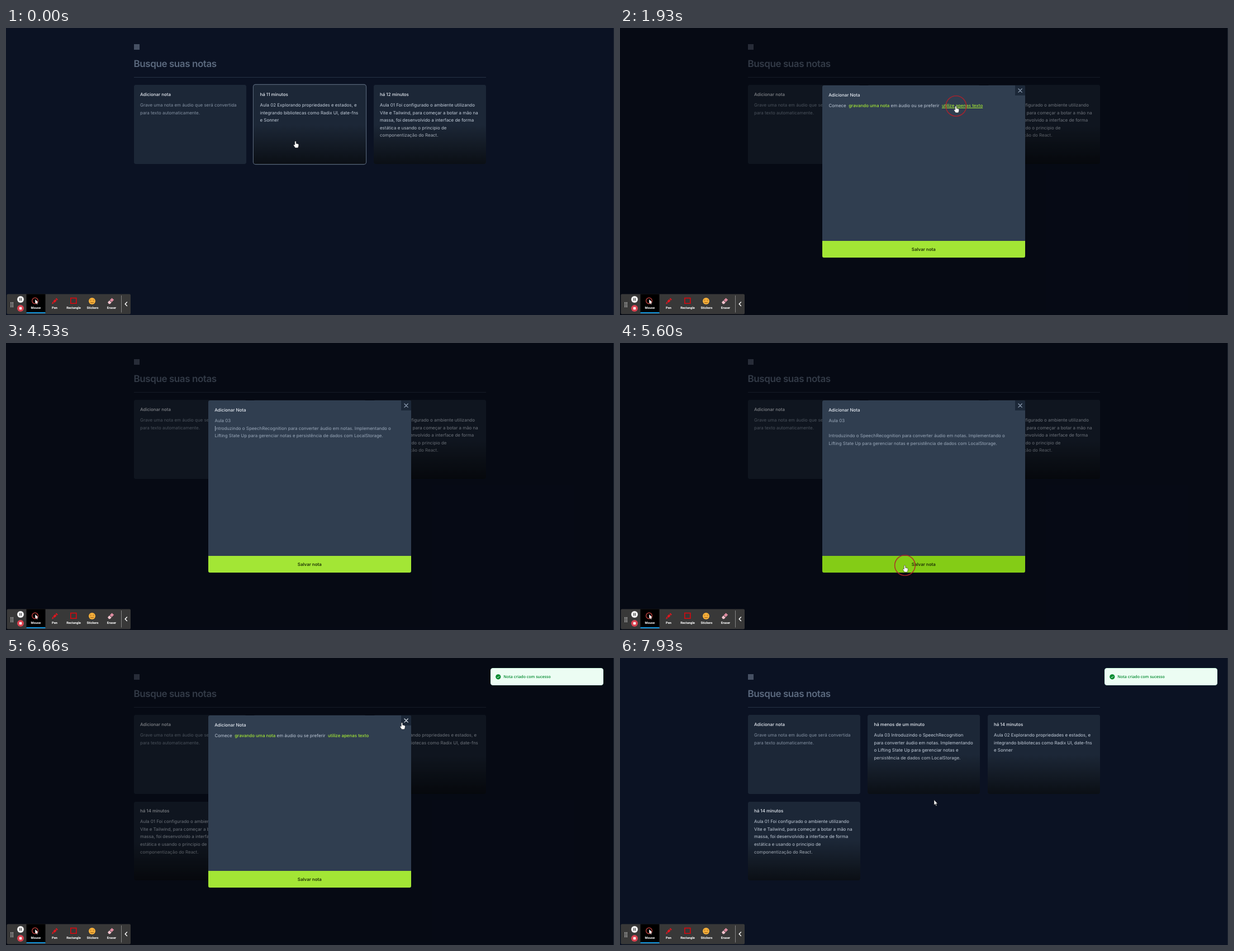
Animation of 1088 by 515 pixels, one loop 8 s. Source, as an HTML page:

```html
<!DOCTYPE html>
<html lang="pt-BR">
<head>
<meta charset="utf-8">
<title>Notas</title>
<style>
  html, body { margin: 0; width: 100%; height: 100%; overflow: hidden; background: #0b1223; }
  #stage {
    position: relative; width: 1088px; height: 515px; overflow: hidden; background: #0b1223;
    font: 400 7.93px/13.6px Inter, sans-serif; font-optical-sizing: none;
    text-rendering: geometricPrecision; white-space: pre;
  }
  #stage div, #stage svg { position: absolute; }
  [hidden] { display: none !important; }
  .fill { inset: 0; }
  .logo { left: 229px; top: 28.5px; width: 10px; height: 10px; background: #465063; }
  .search {
    left: 228.6px; top: 55px; font-weight: 600; font-size: 17px; line-height: 20.4px;
    letter-spacing: -.425px; color: #5b697e;
  }
  .rule { left: 228.6px; top: 88px; width: 630px; height: 1px; background: #263245; }

  .card { width: 200.9px; height: 141.7px; border-radius: 3.4px; background: #1c2737; color: #c4cedb; }
  .card.hover { box-shadow: 0 0 0 1.15px #566477; }
  .card b, .title { left: 11.3px; top: 11.5px; line-height: 11.33px; font-weight: 500; color: #e8edf4; }
  .card b, .card p { position: absolute; margin: 0; }
  .card p { left: 11.3px; top: 29.7px; }
  .card.add { color: #8390a1; }
  .card.note::after {
    content: ""; position: absolute; inset: 50% 0 0; border-radius: 0 0 3.4px 3.4px;
    background: linear-gradient(transparent, rgba(0, 0, 0, .62));
  }

  #shade { background: rgba(0, 1, 3, .45); }
  #dialog {
    left: 362px; top: 103.4px; width: 362.7px; height: 308.6px; border-radius: 3px;
    overflow: hidden; background: #303e50;
  }
  #dialog .title { top: 12px; }
  #intro, #area { left: 11.5px; top: 29.9px; color: #bcc7d5; }
  #area { color: #9aa8b9; }
  .link { color: #a3e635; font-weight: 500; }
  .link.on { text-decoration: underline; }
  #close { right: 0; top: 0; width: 18.1px; height: 18.1px; background: #1c2838; color: #94a3b8; }
  #close.on { color: #e2e8f0; }
  #save {
    left: 0; right: 0; bottom: 0; height: 29.5px; line-height: 30px; text-align: center;
    font-weight: 600; color: #1f3306; background: #a3e635;
  }
  #save.on { background: #84cc16; }
  #caret { width: 1px; height: 9.5px; background: #a5b2c2; }

  #toast {
    left: 866.8px; top: 18px; width: 202.2px; height: 30.8px; box-sizing: border-box;
    border: .6px solid #d3fde5; border-radius: 4px; background: #ecfdf3; color: #008a2e;
    font: 600 7.05px/30.6px "Open Sans", sans-serif;
  }
  #toast span { position: absolute; left: 22.4px; top: 0; }
  #toast svg { left: 8px; top: 10.2px; }
  .edge { right: 0; top: 0; width: 1px; height: 100%; background: #1e2532; }
  .label { font: 700 5.7px Roboto, sans-serif; fill: #fff; text-anchor: middle; }
</style>
</head>
<body>
<div id="stage">
  <div class="logo"></div>
  <div class="search">Busque suas notas</div>
  <div class="rule"></div>
  <div id="before" class="fill"></div>
  <div id="after" class="fill"></div>
  <div id="shade" class="fill"></div>

  <div id="dialog">
    <div class="title">Adicionar Nota</div>
    <div id="intro">Comece&nbsp; <span class="link">gravando uma nota</span> em áudio ou se preferir&nbsp; <span class="link" id="write">utilize apenas texto</span></div>
    <div id="area"></div>
    <div id="close"><svg width="18.1" height="18.1" fill="none" stroke="currentColor" stroke-width="1.1" stroke-linecap="round"><path d="M5.9 6l6.4 6.4M12.3 6l-6.4 6.4"/></svg></div>
    <div id="save">Salvar nota</div>
  </div>
  <div id="caret"></div>

  <div id="toast">
    <svg width="10" height="10"><circle cx="4.8" cy="4.8" r="4.6" fill="#008a2e"/><path d="M2.7 5l1.5 1.5 2.8-3.1" fill="none" stroke="#ecfdf3" stroke-width="1"/></svg>
    <span>Nota criado com sucesso</span>
  </div>
  <div class="edge"></div>

  <svg width="230" height="40" viewBox="0 475 230 40" style="left:0;top:475px">
    <rect x="1.5" y="477.5" width="221.5" height="36" rx="2" fill="#383838"/>
    <path d="M9 492v9M12.2 492v9" stroke="#ddd" stroke-width="1.5" stroke-dasharray="1.4 1.1"/>
    <circle cx="26" cy="487" r="6" fill="#f4f4f4"/>
    <path d="M24.7 484.5v5M27.4 484.5v5" stroke="#333" stroke-width="1.2"/>
    <circle cx="26" cy="503" r="6" fill="#d9414f"/>
    <rect x="23.8" y="500.8" width="4.4" height="4.4" rx=".6" fill="#fff"/>
    <rect x="36.5" y="477.5" width="34" height="34" fill="#000"/>
    <rect x="36.5" y="510" width="34" height="2" fill="#1598e0"/>
    <circle cx="52" cy="489.5" r="5.3" fill="none" stroke="#c8433f" stroke-width="1.3"/>
    <path d="M52.3 487v7.6l1.8-1.5 1.2 2.6 1.2-.5-1.2-2.6h2.3z" fill="#fff"/>
    <path d="M82 495.5l1.4-4.2 2.4 2.4zM84.2 490.4l3.6-3.7 2.7 2.7-3.7 3.6zM88.6 486l1.5-1.4 2.7 2.6-1.5 1.5z" fill="#e3151d"/>
    <rect x="115.8" y="484.6" width="10" height="9.6" fill="none" stroke="#d5090f" stroke-width="1.6"/>
    <circle cx="154" cy="490" r="6" fill="#f8b13a"/>
    <path d="M150.4 488.8q1.1-1.3 2.2 0M155.4 488.8q1.1-1.3 2.2 0M151 492q3 2.4 6 0" fill="none" stroke="#7a4516" stroke-width=".9"/>
    <path d="M182 492.2l3-3.2 3.8 3.4-2.6 2.8h-2.2z" fill="#f3c3cd"/>
    <path d="M185.6 488.4l3.8-4 3.8 3.4-3.8 4z" fill="#dd8ba0"/>
    <g class="label">
      <text x="53.3" y="504.2">Mouse</text><text x="87" y="504.2">Pen</text>
      <text x="121" y="504.2">Rectangle</text><text x="155" y="504.2">Stickers</text>
      <text x="189" y="504.2">Eraser</text>
    </g>
    <path d="M206.5 480v30.5" stroke="#858585"/>
    <path d="M216.8 491.4l-3.6 3.8 3.6 3.8" fill="none" stroke="#fff" stroke-width="1.4"/>
  </svg>

  <svg width="1088" height="515" class="fill">
    <circle id="ring" r="18.3" fill="none" stroke="#b3202b" stroke-width="1.6" stroke-opacity=".85"/>
    <g id="pointer">
      <path id="hand" d="M-1.2 1.2a1.2 1.2 0 0 1 2.4 0V4.2l3.2.7q1.6.4 1.4 2L5.4 9.6 4.5 12H-.4L-3 8.2q-.9-1.3.2-1.9.8-.3 1.6.6z" fill="#fff" stroke="#111" stroke-width=".5"/>
      <path id="arrow" d="M0 0V9.4L2.1 7.4 3.6 10.9 5 10.3 3.5 6.9H6.4z" fill="#fff" stroke="#111" stroke-width=".6"/>
      <path id="beam" d="M-2-5h4M0-5V5M-2 5h4" fill="none" stroke="#dfe4ea" stroke-width=".9"/>
    </g>
  </svg>
</div>

<script>
const LOOP = 8000;
const $ = id => document.getElementById(id);
const within = (t, a, b) => t >= a && t < b;
const ease = k => k * k * (3 - 2 * k);

const OPEN = 680, WRITE = 2000, PASTE = 2870, BREAK = 4660, SAVE = 5700, CLOSE = 6960;
const HEAD = 'Aula 03\n';
const BODY = 'Introduzindo o SpeechRecognition para converter áudio em notas. Implementando o\n' +
  'Lifting State Up para gerenciar notas e persistência de dados com LocalStorage.';

const add = ['Adicionar nota', 'Grave uma nota em áudio que será convertida\npara texto automaticamente.'];
const first = 'Aula 01 Foi configurado o ambiente utilizando\nVite e Tailwind, para começar a botar a mão na\n' +
  'massa, foi desenvolvido a interface de forma\nestática e usando o principio de\ncomponentização do React.';
const second = 'Aula 02 Explorando propriedades e estados, e\nintegrando bibliotecas como Radix UI, date-fns\ne Sonner';
const third = 'Aula 03 Introduzindo o SpeechRecognition\npara converter áudio em notas. Implementando\n' +
  'o Lifting State Up para gerenciar notas e\npersistência de dados com LocalStorage.';

function grid(id, notes) {
  return notes.map(([title, text], i) => {
    const x = 228.7 + i % 3 * 214.5, y = 102.3 + Math.floor(i / 3) * 155.2;
    const el = document.createElement('div');
    el.className = 'card ' + (i ? 'note' : 'add');
    el.style.cssText = `left:${x}px;top:${y}px`;
    el.innerHTML = `<b>${title}</b><p>${text}</p>`;
    $(id).append(el);
    return { el, x, y };
  });
}
const before = grid('before', [add, ['há 11 minutos', second], ['há 12 minutos', first]]);
const after = grid('after', [add, ['há menos de um minuto', third], ['há 14 minutos', second], ['há 14 minutos', first]]);

// time, x, y of the pointer tip
const path = [
  [60, 518, 203], [560, 362, 200.5], [930, 362, 200.5], [1700, 601, 140], [5200, 601, 140],
  [5470, 509.5, 399], [5800, 509.5, 399], [6560, 708.5, 116], [7000, 708.5, 116], [7650, 562, 254.5]
];
const clicks = [[600, 870], [1830, 2080], [5500, 5760], [6800, 7030]];
// time of each key press and where the caret lands
const keys = [[WRITE, 373.5, 135], [PASTE, 676, 162.2], [4130, 676, 148.6], [4400, 373.5, 148.6], [BREAK, 373.5, 162.2]];

function pointerAt(t) {
  const i = path.findIndex(p => p[0] > t);
  if (i === 0) return path[0].slice(1);
  if (i < 0) return path[path.length - 1].slice(1);
  const [a, x0, y0] = path[i - 1], [b, x1, y1] = path[i];
  const k = ease((t - a) / (b - a));
  return [x0 + (x1 - x0) * k, y0 + (y1 - y0) * k];
}

function draw(t) {
  const open = within(t, OPEN, CLOSE), typing = within(t, WRITE, SAVE), saved = t >= SAVE;
  const [x, y] = pointerAt(t);
  const over = (l, top, r, b) => within(x, l, r) && within(y, top, b);

  $('before').hidden = saved;
  $('after').hidden = !saved;
  $('shade').hidden = $('dialog').hidden = !open;
  $('intro').hidden = typing;
  $('area').hidden = !typing;
  $('area').textContent = t < PASTE ? '' : HEAD + (t < BREAK ? '' : '\n') + BODY;

  let kind = 'arrow';
  for (const c of saved ? after : before) {
    const hit = !open && over(c.x, c.y, c.x + 200.9, c.y + 141.7);
    c.el.classList.toggle('hover', hit);
    if (hit) kind = 'hand';
  }
  if (open) {
    const onSave = over(362, 382, 725, 412), onClose = over(706.6, 103, 725, 121.5);
    const onWrite = !typing && over(575, 133, 649, 147);
    $('save').classList.toggle('on', onSave);
    $('close').classList.toggle('on', onClose);
    $('write').classList.toggle('on', onWrite);
    if (onSave || onClose || onWrite || t < 950) kind = 'hand';
    else if (typing && y > 130) kind = 'beam';
  }
  for (const id of ['hand', 'arrow', 'beam']) $(id).style.display = id === kind ? '' : 'none';
  $('pointer').style.display = within(t, PASTE, 5200) ? 'none' : '';
  $('pointer').setAttribute('transform', `translate(${x} ${y})`);

  $('ring').style.display = clicks.some(([a, b]) => within(t, a, b)) ? '' : 'none';
  $('ring').setAttribute('cx', x + .4);
  $('ring').setAttribute('cy', y);

  const key = keys.filter(k => k[0] <= t).pop();
  const blink = key && Math.floor((t - key[0]) / 530) % 2 === 0;
  $('caret').hidden = !(within(t, WRITE, 5500) && blink);
  if (key) $('caret').style.cssText = `left:${key[1]}px;top:${key[2]}px`;

  const k = Math.min(1, Math.max(0, (t - SAVE - 30) / 400));
  const slide = 1 - (1 - k) ** 3;
  $('toast').hidden = k === 0;
  $('toast').style.opacity = slide;
  $('toast').style.transform = k < 1 ? `translateY(${-30.8 * (1 - slide)}px)` : 'none';
}

const start = performance.now();
function tick() {
  draw((performance.now() - start) % LOOP);
  requestAnimationFrame(tick);
}
tick();
</script>
</body>
</html>
```
